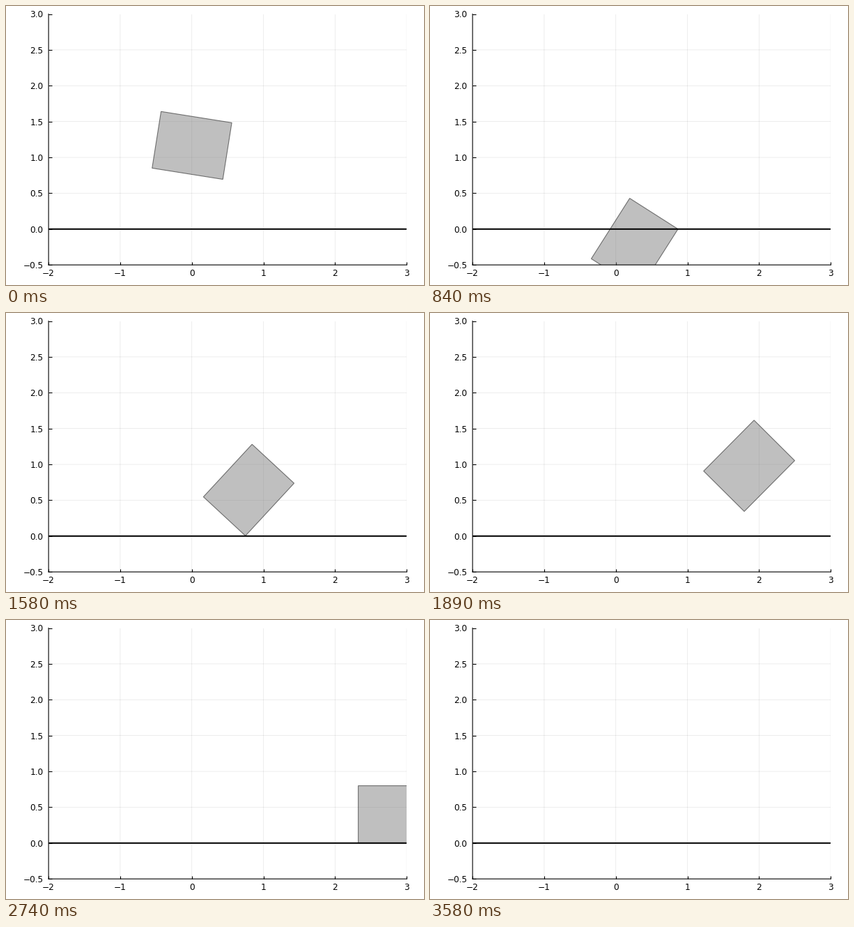
Write a matplotlib script that moves like this. It is 600 px wide and 400 px high and loops after 4050 ms.

```python
import numpy as np
import matplotlib.pyplot as plt
from matplotlib.animation import FuncAnimation
from matplotlib.patches import Polygon

W, H, DPI = 600, 400, 100
LOOP_MS, TICK_MS = 4050, 30
STATE_MS = 1000 / 19  # time between simulation states
PX = 72 / DPI  # points per pixel

# Half sizes of the box, and its corners in body coordinates
A, B = 0.5, 0.4
BODY = np.array([(-A, -B), (A, -B), (A, B), (-A, B)])
LEFT_FOOT, RIGHT_FOOT = BODY[0], BODY[1]

# States that repeat the one before them (contact events)
HOLDS = np.array([9, 12, 20, 25, 27, 29, 31, 33, 37, 39, 41, 44, 46, 49, 53])

# Poses (x, y, degrees) that join the phases of the motion
START = np.array([0.002, 1.167, -9.0])
TOUCH = np.array([0.308, 0.518, -14.9])
RISE = np.array([0.795, 0.642, 47.2])
DROP = np.array([1.862, 0.980, 45.2])
LAND = np.array([2.183, 0.640, 44.4])
FLAT_X = 2.824
SLIDE = 0.0457


def rotate(points, degrees):
    a = np.radians(degrees)
    c, s = np.cos(a), np.sin(a)
    return points @ np.array([(c, s), (-s, c)])


def mix(p, q, u):
    return p + (q - p) * u


def hang(s):
    """Swing about the right foot, which slides along the floor."""
    if s <= 9:
        angle = -14.9 + 5.986 * s + 1.014 * s * s
    else:
        angle = 121 - 5.5 * (s - 9)
    x, y = np.array([0.687 + 0.0303 * s, 0]) - rotate(RIGHT_FOOT, angle)
    return np.array([x, y, angle])


def pose(step):
    if step <= 8:  # free fall
        t = min(step / 7.5, 1)
        p = mix(START, TOUCH, t)
        p[1] = mix(START[1], TOUCH[1], t * t)
        return p
    if step <= 19:
        return hang(step - 8)
    if step <= 24:  # back up through the floor
        u = (step - 19) / 5
        p = mix(hang(11), RISE, u)
        p[0] -= 0.12 * 4 * u * (1 - u)
        return p
    if step <= 28:  # high arc
        u = (step - 24) / 4
        p = mix(RISE, DROP, u)
        p[1] += 0.854 * 4 * u * (1 - u)
        return p
    if step <= 30:
        return mix(DROP, LAND, (step - 28) / 2)
    if step < 38:  # tip over the left foot
        u = (step - 30) / 7.45
        angle = LAND[2] * (1 - u ** 1.3)
        return np.array([mix(LAND[0], FLAT_X, u),
                         -rotate(LEFT_FOOT, angle)[1], angle])
    return np.array([FLAT_X + SLIDE * (step - 38), B, 0])


def corners(ms):
    state = int(ms / STATE_MS)
    step = state - np.count_nonzero(HOLDS <= state)
    x, y, angle = pose(step)
    return rotate(BODY, angle) + (x, y)


plt.rcParams["font.family"] = "DejaVu Sans"
plt.rcParams["path.snap"] = False
fig = plt.figure(figsize=(W / DPI, H / DPI), dpi=DPI, facecolor="white")
left, right, top, bottom = 61.1, 575.1, 11.5, 371.2
ax = fig.add_axes([left / W, 1 - bottom / H,
                   (right - left) / W, (bottom - top) / H])
ax.set(xlim=(-2, 3), ylim=(-0.5, 3),
       xticks=np.arange(-2, 4), yticks=np.arange(-0.5, 3.1, 0.5))
ax.set_axisbelow(True)
ax.grid(color="black", alpha=0.1, linewidth=0.7 * PX)
ax.tick_params(direction="in", length=4.5 * PX, width=1.1 * PX, labelsize=8.7)
ax.tick_params(axis="x", pad=5.4 * PX)
ax.tick_params(axis="y", pad=7.6 * PX)
for side in ("top", "right"):
    ax.spines[side].set_visible(False)
for side in ("left", "bottom"):
    ax.spines[side].set_linewidth(1.1 * PX)

box = Polygon(corners(0), closed=True, facecolor=(0.5, 0.5, 0.5, 0.5),
              edgecolor=(0, 0, 0, 0.5), linewidth=1.1 * PX, zorder=2)
ax.add_patch(box)
ax.plot([-2, 3], [0, 0], color="black", linewidth=2 * PX,
        solid_capstyle="butt", zorder=2.2)


def draw(tick):
    # Sample late in the tick so no state shows up behind time
    box.set_xy(corners((tick + 0.8) * TICK_MS))
    return (box,)


anim = FuncAnimation(fig, draw, frames=LOOP_MS // TICK_MS, interval=TICK_MS,
                     repeat=True, repeat_delay=0)
plt.show()
```
